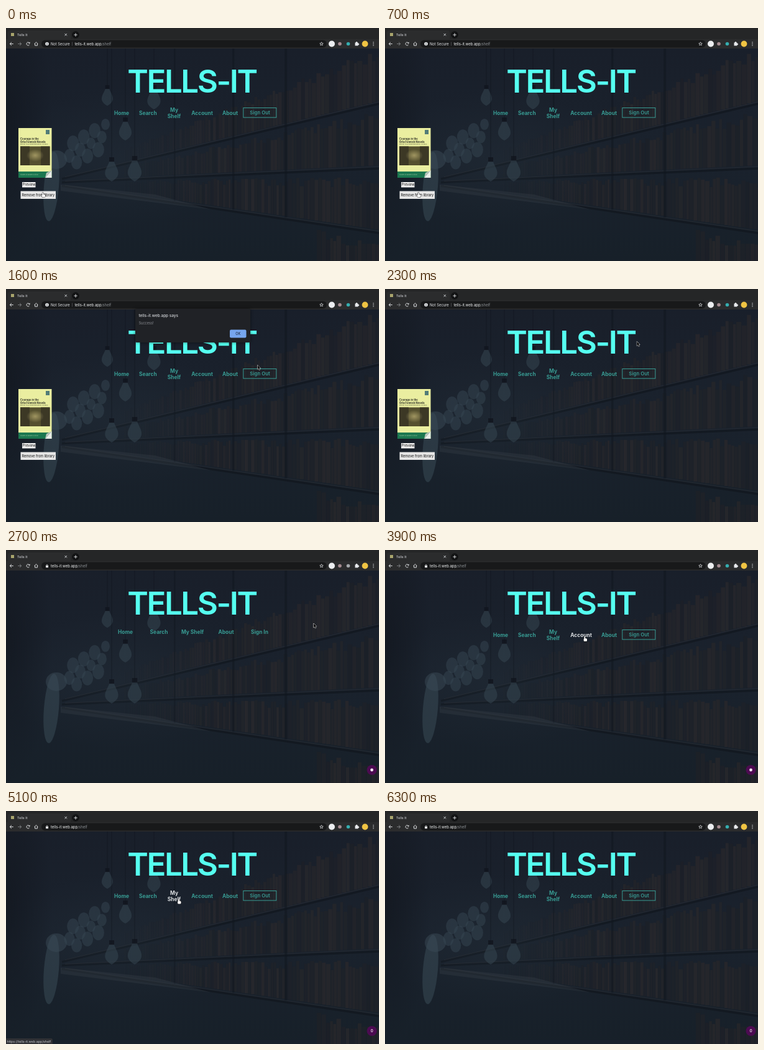
Write an HTML page with a canvas that moves like this. It is 600 by 375 pixels and loops after 6600 ms.

```html
<!DOCTYPE html>
<html lang="en">
<head>
<meta charset="utf-8">
<title>Tells It</title>
<style>
html, body { margin: 0; width: 100%; height: 100%; overflow: hidden; background: #18202b; }
canvas { display: block; width: 600px; height: 375px; }
</style>
</head>
<body>
<canvas id="stage" width="600" height="375"></canvas>
<script>
const W = 600, H = 375, LOOP = 6600, STEP = 100;
const UI = 'Inter, Roboto, sans-serif';
const TEAL = '#389b93', LIGHT = '#e8eaed', BAR = '#2b2c2d', PILL = '#18191a';
const HOST = 'tells-it.web.app';
const stage = document.getElementById('stage').getContext('2d');
let c = stage;

function rect(x, y, w, h, fill) {
  c.fillStyle = fill;
  c.fillRect(x, y, w, h);
}
function round(x, y, w, h, r, fill) {
  c.fillStyle = fill;
  c.beginPath();
  c.roundRect(x, y, w, h, r);
  c.fill();
}
function oval(x, y, rx, ry, fill, turn = 0) {
  c.fillStyle = fill;
  c.beginPath();
  c.ellipse(x, y, rx, ry, turn, 0, 7);
  c.fill();
}
const dot = (x, y, r, fill) => oval(x, y, r, r, fill);
function trace(points) {
  c.beginPath();
  for (let i = 0; i < points.length; i += 2) c.lineTo(points[i], points[i + 1]);
}
function line(points, color, width = 0.9) {
  trace(points);
  c.strokeStyle = color;
  c.lineWidth = width;
  c.stroke();
}
function poly(points, fill) {
  trace(points);
  c.fillStyle = fill;
  c.fill();
}
function text(s, x, y, size, color, weight = 400, align = 'left', gap = 0) {
  c.font = `${weight} ${size}px ${UI}`;
  c.textAlign = align;
  c.letterSpacing = gap + 'px';
  c.fillStyle = color;
  c.fillText(s, x, y);
  return c.measureText(s).width;
}
function glow(x, y, rx, ry, rgb, alpha) {
  c.save();
  c.translate(x, y);
  c.scale(rx, ry);
  const g = c.createRadialGradient(0, 0, 0, 0, 0, 1);
  g.addColorStop(0, `rgba(${rgb},${alpha})`);
  g.addColorStop(1, `rgba(${rgb},0)`);
  rect(-1, -1, 2, 2, g);
  c.restore();
}
function seeded(n) {
  return () => (n = (n * 16807) % 2147483647) / 2147483647;
}

// Shelves meet at a vanishing point on the left; k counts them from the top
const shelfY = (k, x) => 248 + (15 + 104 * k - 248) * (x - 60) / 540;

function drawBooks() {
  const rnd = seeded(91);
  for (let k = 0; k < 4; k++) {
    for (let x = k < 3 ? 190 : 500; x < W;) {
      const w = 2 + (3 + rnd() * 4) * (x / W);
      const base = shelfY(k + 1, x) - 2;
      const h = (base - shelfY(k, x)) * (0.66 + rnd() * 0.2);
      const v = rnd() * 14, fade = Math.min(0.8, (x - 170) / 220);
      rect(x, base - h, w - 0.5, h, `rgba(${28 + v},${32 + v * 0.6},${39 + v * 0.35},${fade})`);
      x += w;
    }
  }
  for (let k = 1; k < 4; k++) {
    line([90, shelfY(k, 90) + 2, W, shelfY(k, W) + 3], 'rgba(15,20,28,.6)', 3.5);
    line([95, shelfY(k, 95), W, shelfY(k, W)], 'rgba(50,53,58,.5)', 1);
  }
  for (const x of [270, 364, 448]) {
    rect(x, 33, x / 110, shelfY(3, x) - 33, 'rgba(17,22,31,.5)');
  }
}

function bulb(x, y, s) {
  line([x, 33, x, y - 14 * s], 'rgba(14,18,26,.6)', 0.8);
  rect(x - 4 * s, y - 20 * s, 8 * s, 8 * s, 'rgba(17,21,29,.8)');
  c.fillStyle = 'rgba(54,70,81,.55)';
  c.beginPath();
  c.moveTo(x - 4 * s, y - 13 * s);
  c.bezierCurveTo(x - 6 * s, y - 4 * s, x - 20 * s, y + 8 * s, x, y + 19 * s);
  c.bezierCurveTo(x + 20 * s, y + 8 * s, x + 6 * s, y - 4 * s, x + 4 * s, y - 13 * s);
  c.fill();
}

function drawPhoto() {
  const g = c.createLinearGradient(0, 33, 0, H);
  g.addColorStop(0, '#191f2a');
  g.addColorStop(0.5, '#1a222d');
  g.addColorStop(1, '#172029');
  rect(0, 33, W, H - 33, g);
  drawBooks();
  glow(180, 210, 180, 110, '42,54,64', 0.25);
  glow(0, 150, 75, 230, '16,20,27', 0.6);
  poly([88, 252, 240, 268, 330, 292, 88, 262], 'rgba(55,64,72,.35)');
  oval(73, 255, 12, 56, 'rgba(58,75,86,.55)', 0.08);
  oval(81, 212, 17, 15, 'rgba(58,75,86,.5)');

  const rnd = seeded(17);
  for (let i = 0; i < 11; i++) {
    const k = i / 10, r = 7 + rnd() * 3;
    oval(160 - 58 * k, 172 + 34 * k + (i % 3 - 1) * 17, r, r * 1.3, 'rgba(54,70,81,.5)');
  }
  bulb(163, 109, 0.85);
  bulb(238, 112, 1);
  bulb(192, 163, 0.95);
  bulb(170, 228, 1);
  bulb(207, 227, 1.05);
}

function drawChrome() {
  rect(0, 0, W, 19, '#252627');
  round(3, 4, 101, 18, 4, BAR);
  rect(0, 18, W, 15, BAR);
  rect(8, 8, 5, 5, '#a9a56d');
  text('Tells It', 18, 13, 5.4, '#dfe1e5');
  line([94.5, 9, 98, 12.5], LIGHT, 0.8);
  line([98, 9, 94.5, 12.5], LIGHT, 0.8);
  dot(112, 11, 5.8, '#111213');
  line([109.3, 11, 114.7, 11], LIGHT);
  line([112, 8.3, 112, 13.7], LIGHT);

  for (const [x, d, color] of [[9, 1, LIGHT], [22, -1, '#85878b']]) {
    line([x - 2.8, 25.5, x + 2.8, 25.5], color);
    line([x, 22.8, x - 2.8 * d, 25.5, x, 28.2], color);
  }
  c.beginPath();
  c.arc(35.5, 25.5, 2.5, 0.5, 5.6);
  c.strokeStyle = LIGHT;
  c.stroke();
  poly([36, 25, 38.5, 25, 38.5, 22.5], LIGHT);
  line([45.6, 25.6, 48.5, 22.8, 51.4, 25.6], LIGHT);
  line([46.6, 25, 46.6, 28.2, 50.4, 28.2, 50.4, 25], LIGHT);

  round(57, 19.5, 459, 12, 6, PILL);
  const star = [];
  for (let i = 0; i <= 10; i++) {
    const a = i * Math.PI / 5 - Math.PI / 2, r = i % 2 ? 1.3 : 2.9;
    star.push(507.5 + r * Math.cos(a), 25.6 + r * Math.sin(a));
  }
  line(star, LIGHT, 0.7);
  dot(524, 25.5, 5, '#eceef0');
  dot(537, 25.5, 2.8, '#a58b90');
  rect(561.5, 23.5, 5, 5, LIGHT);
  dot(564, 23.2, 1.3, LIGHT);
  dot(566.8, 26, 1.3, LIGHT);
  dot(577.5, 25.5, 4.9, '#f0c443');
  for (const y of [23, 25.5, 28]) dot(591, y, 0.7, LIGHT);
}

function drawAddress(secure) {
  let x = 72;
  if (secure) {
    rect(64, 25, 4, 3.3, LIGHT);
    c.beginPath();
    c.arc(66, 24.8, 1.3, Math.PI, 0);
    c.strokeStyle = LIGHT;
    c.lineWidth = 0.7;
    c.stroke();
  } else {
    dot(66, 25.5, 2.8, LIGHT);
    rect(65.6, 25, 0.8, 2.2, PILL);
    rect(65.6, 23.7, 0.8, 0.8, PILL);
    text('Not Secure', 72, 27.6, 5.8, LIGHT);
    rect(106, 22.5, 0.5, 6, '#77797d');
    x = 110.5;
  }
  const w = text(HOST, x, 27.6, 5.9, '#f1f3f4');
  text('/shelf', x + w, 27.6, 5.9, '#8d9196');
}

function drawShelf() {
  rect(20, 161, 53.5, 80, '#eaeea0');
  rect(64, 164, 6, 7, '#527c78');
  text('Courage in the', 23, 179.5, 4.2, '#33352b', 700);
  text('Orla Fennick Novels', 23, 184.5, 4.2, '#33352b', 700);
  text('edited by TESSA MORROWEN and IDA CALDRICK', 23, 188.4, 1.9, '#55573f');
  rect(23, 190.5, 47.5, 30.5, '#55502f');
  rect(23, 190.5, 15, 30.5, '#3c3825');
  rect(56, 190.5, 14.5, 30.5, '#3c3825');
  glow(47, 205, 14, 10, '210,196,130', 0.6);
  rect(20, 231, 53.5, 10, '#1c7750');
  text('Studies in Modern Fiction', 23, 237.2, 2.4, '#9cc6a2');
  poly([63, 241, 73.5, 229, 73.5, 241], '#e9ece8');
  poly([63, 241, 65, 233, 73.5, 229], '#b9c4bb');

  rect(26, 248, 21.5, 8.5, '#f3f3f3');
  text('Preview', 26.6, 254.4, 5.6, '#111');
  rect(23.5, 262.5, 56.5, 12.5, '#e6e6e6');
  text('Remove from library', 51.8, 270.8, 5.5, '#111', 400, 'center');
}

function nav(label, x, y, hot) {
  text(label, x, y, 8.4, hot ? '#dcdfe2' : TEAL, 700, 'center');
}
function drawNav(signedIn, hover) {
  if (!signedIn) {
    ['Home', 'Search', 'My Shelf', 'About', 'Sign In'].forEach((s, i) =>
      nav(s, 192 + 54 * i, 135, s === hover));
    return;
  }
  nav('Home', 186, 139.8);
  nav('Search', 228.3, 139.8);
  nav('My', 270.5, 135, hover === 'My Shelf');
  nav('Shelf', 270.5, 144.5, hover === 'My Shelf');
  nav('Account', 315.5, 139.8, hover === 'Account');
  nav('About', 360.5, 139.8);
  c.strokeStyle = TEAL;
  c.lineWidth = 1;
  c.strokeRect(381.8, 128.5, 53, 15.5);
  text('Sign Out', 408.6, 138.8, 7.7, TEAL, 600, 'center', 0.1);
}

function drawDialog() {
  c.save();
  c.shadowColor = 'rgba(0,0,0,.5)';
  c.shadowBlur = 5;
  round(208, 32, 185, 54, 2, '#202226');
  c.restore();
  text(HOST + ' says', 213.5, 44.7, 6.4, '#d4d6da', 500);
  text('Success!', 213.5, 56.6, 5.6, '#8b8e93');
  round(360, 65.5, 26.5, 13, 2, '#76a5ee');
  text('OK', 373.3, 74.2, 5.6, '#26334c', 500, 'center');
}

function drawStatus(path) {
  c.font = `400 5.3px ${UI}`;
  c.letterSpacing = '0px';
  const url = `https://${HOST}/${path}`;
  round(0, 366, c.measureText(url).width + 4, 9, [0, 2, 0, 0], '#303135');
  text(url, 1.5, 372.7, 5.3, '#c3c6ca');
}

// Pointer moves: each glides from the last place to x, y between two times
const MOVES = [
  { from: 0, to: 700, x: 53.5, y: 264.5 },
  { from: 900, to: 1600, x: 404.7, y: 122.5 },
  { from: 1600, to: 1900, x: 374, y: 73 },
  { from: 2100, to: 2700, x: 494.7, y: 118 },
  { from: 2700, to: 3200, x: 313, y: 132 },
  { from: 3500, to: 3900, x: 321, y: 139 },
  { from: 4200, to: 4700, x: 277.5, y: 141.5 },
  { from: 5400, to: 5700, x: 330, y: 170 }
];
function pointerAt(t) {
  let x = 59, y = 264.5;
  for (const m of MOVES) {
    const k = Math.max(0, Math.min(1, (t - m.from) / (m.to - m.from)));
    const e = k * k * (3 - 2 * k);
    x += (m.x - x) * e;
    y += (m.y - y) * e;
  }
  return [x, y];
}
function drawPointer([x, y], hand) {
  c.save();
  c.translate(x, y);
  c.beginPath();
  if (hand) {
    c.roundRect(-0.6, 0, 1.7, 6, 0.8);
    c.roundRect(-1.4, 3.2, 5.4, 4.8, 1.5);
  } else {
    trace([0, 0, 0, 6.7, 1.5, 5.3, 2.7, 8, 3.8, 7.5, 2.7, 4.9, 4.7, 4.8, 0, 0]);
  }
  c.lineJoin = 'round';
  c.fillStyle = hand ? '#fff' : '#090909';
  c.strokeStyle = hand ? '#111' : '#eee';
  c.lineWidth = 1;
  c.stroke();
  c.fill();
  c.restore();
}

const backdrop = document.createElement('canvas');
backdrop.width = W;
backdrop.height = H;
c = backdrop.getContext('2d');
drawPhoto();
drawChrome();
text('TELLS-IT', 299, 104, 51, '#55fff0', 600, 'center', -2.4);
c = stage;

const during = (t, a, b) => t >= a && t < b;

function hoverAt(t) {
  if (during(t, 3100, 3600) || during(t, 4500, 5500)) return 'My Shelf';
  return during(t, 3600, 4400) ? 'Account' : '';
}

function draw(t) {
  const first = t < 2400, guest = during(t, 2400, 3600), hover = hoverAt(t);
  c.drawImage(backdrop, 0, 0);
  drawAddress(!first);
  dot(550.5, 25.5, 2.8, guest ? '#a5a8ac' : '#35aeb0');
  drawNav(!guest, hover);
  if (first) {
    drawShelf();
  } else {
    dot(588.5, 354, 8, '#4c0b51');
    if (t < 4300) dot(588.5, 354, 2.4, '#f0e8f2');
    else text('0', 588.5, 356.4, 6.5, '#f0e8f2', 500, 'center');
  }
  if (during(t, 1000, 2100)) drawDialog();
  if (during(t, 4000, 4500)) drawStatus('account');
  if (during(t, 4500, 5600)) drawStatus('shelf');
  if (t < 6000) drawPointer(pointerAt(t), t < 1000 || hover);
}

const start = performance.now();
function tick() {
  const t = (performance.now() - start) % LOOP;
  draw(Math.floor(t / STEP) * STEP);
  requestAnimationFrame(tick);
}
tick();
</script>
</body>
</html>
```
